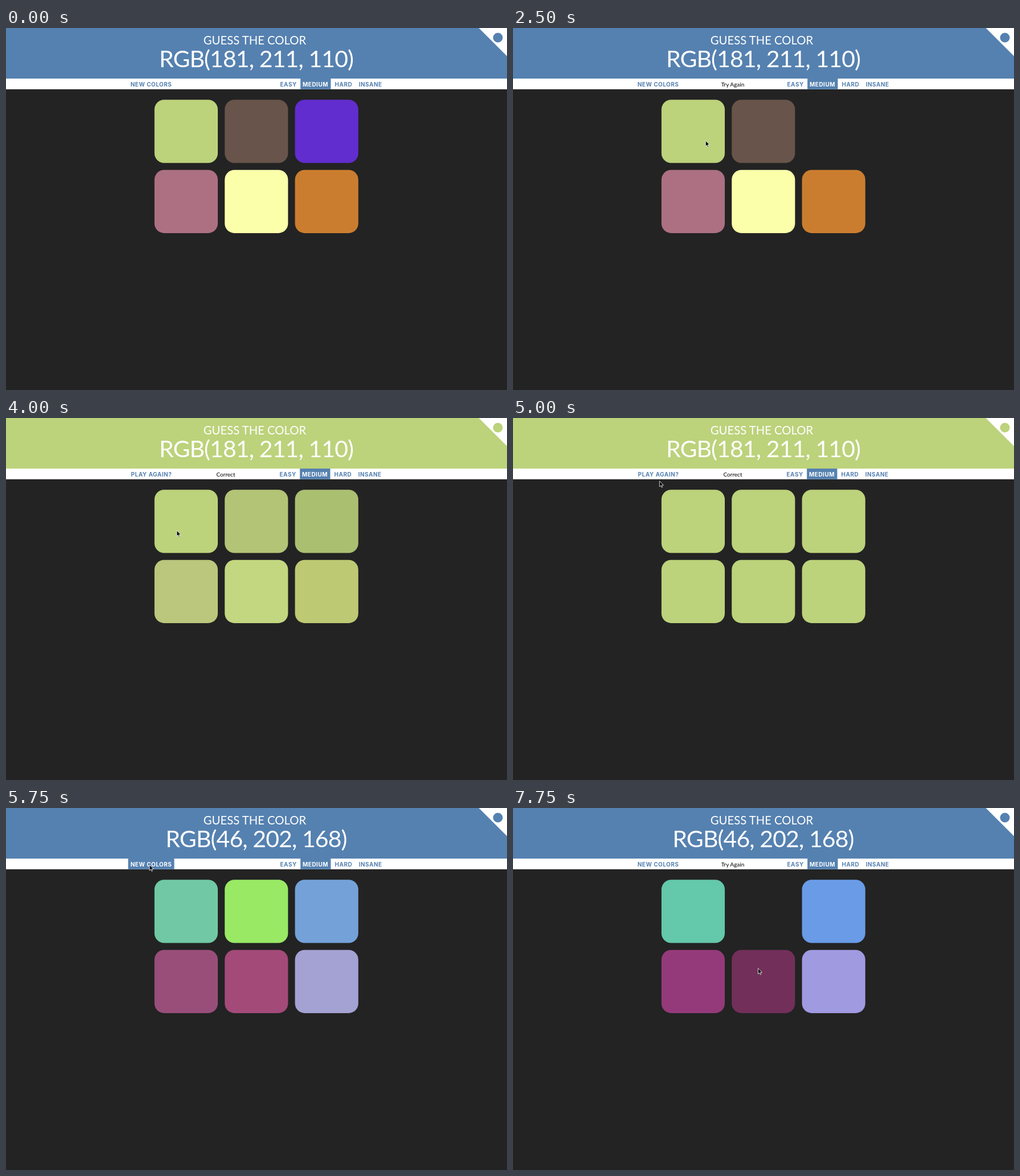
An HTML page for the animation above (8 s loop, 880x637 px).

```html
<!DOCTYPE html>
<html lang="en">
<head>
<meta charset="utf-8">
<title>Guess the color</title>
<style>
  html, body { margin: 0; width: 100%; height: 100%; overflow: hidden; background: #232323; }
  svg { display: block; width: 100%; height: 100%; }
  .title { font-family: Lato, sans-serif; fill: #fff; text-anchor: middle; }
  .nav { font: 700 10px Inter, sans-serif; letter-spacing: .5px; fill: #5581b0; }
  #message { font: 10px Lato, sans-serif; text-anchor: middle; }
</style>
</head>
<body>
<svg viewBox="0 0 880 637">
  <rect id="header" width="880" height="89"/>
  <text class="title" x="437" y="29" font-size="20.3">GUESS THE COLOR</text>
  <text class="title" id="goal" x="439.5" y="69" font-size="41" letter-spacing="-.9"></text>
  <path d="M830.5 0H880V49.5Z" fill="#fff"/>
  <circle id="badge" cx="864" cy="17" r="8.5"/>
  <rect y="89" width="880" height="18.8" fill="#fff"/>
  <rect id="hover" x="214.5" y="89" width="81" height="18.8" fill="#5581b0"/>
  <text class="nav" id="reset" y="102.5"></text>
  <text id="message" x="386" y="102.5"></text>
  <g class="nav" id="modes">
    <rect x="517.2" y="89" width="53.3" height="18.8"/>
    <text x="481.5" y="102.5">EASY</text>
    <text x="521" y="102.5" fill="#fff">MEDIUM</text>
    <text x="577.5" y="102.5">HARD</text>
    <text x="619.7" y="102.5">INSANE</text>
  </g>
  <g id="cells"></g>
  <path id="cursor" d="M0 0V10L2.3 7.9L3.9 11.4L5.4 10.7L3.9 7.3H7Z" stroke="#fff" stroke-width=".8"/>
</svg>
<script>
const $ = id => document.getElementById(id);
const LOOP = 8000, STEP = 250, FADE = 600;
const BLUE = '#5581b0', DARK = '#232323', WIN = '#bcd27b';
const first = [WIN, '#68544a', '#612dce', '#ac7082', '#fbffaa', '#cb7d2f'];
const second = ['#64c8aa', '#93ed62', '#699be7', '#943a7a', '#9f3579', '#a09ae1'];

// Each click: time and the new colour of every cell it affects
const miss = { at: 1850, to: { 2: DARK } };
const win = { at: 3600, to: Array(6).fill(WIN) };
const restart = { at: 5370, to: second };
const missAgain = { at: 6720, to: { 1: DARK } };
const lastMiss = { at: 7630, to: { 4: DARK } };
const clicks = [miss, win, restart, missAgain, lastMiss];

// The pointer rests at each place until it glides to the next
const glides = [
  { from: 500, to: 1750, x: 582, y: 196 },
  { from: 2000, to: 3000, x: 257, y: 199 },
  { from: 3000, to: 3750, x: 300, y: 198 },
  { from: 4500, to: 5250, x: 252, y: 100 },
  { from: 5750, to: 6000, x: 410, y: 180.5 },
  { from: 6750, to: 7500, x: 430.5, y: 282 }
];

const rgb = hex => [1, 3, 5].map(i => parseInt(hex.slice(i, i + 2), 16));
const mix = (a, b, p) => a.map((v, i) => v + (b[i] - v) * p);
// Ease-out progress of t through a span
const progress = (t, from, to) => 1 - (1 - Math.min(1, Math.max(0, (t - from) / (to - from)))) ** 2;

const cells = first.map((_, i) => {
  const cell = document.createElementNS('http://www.w3.org/2000/svg', 'rect');
  const box = { x: 260.8 + i % 3 * 123.4, y: 126.3 + (i > 2) * 123.4, width: 111.2, height: 111.2, rx: 17 };
  for (const key in box) cell.setAttribute(key, box[key]);
  return $('cells').appendChild(cell);
});

function cellColor(i, t) {
  const color = clicks.reduce(
    (c, { at, to }) => to[i] ? mix(c, rgb(to[i]), progress(t, at, at + FADE)) : c, rgb(first[i]));
  return `rgb(${color.map(Math.round)})`;
}

const pointer = t => glides.reduce(
  (p, g) => mix(p, [g.x, g.y], progress(t, g.from, g.to)), [880, 172]);

function draw(t) {
  const fresh = t > restart.at;
  const won = t > win.at && !fresh;
  const wrong = t > (fresh ? missAgain.at : miss.at);
  const [x, y] = pointer(t);
  const hover = x > 214 && x < 296 && y > 89 && y < 108;

  cells.forEach((cell, i) => cell.setAttribute('fill', cellColor(i, t)));
  for (const id of ['header', 'badge']) $(id).setAttribute('fill', won ? WIN : BLUE);
  $('goal').textContent = fresh ? 'RGB(46, 202, 168)' : 'RGB(181, 211, 110)';
  $('message').textContent = won ? 'Correct' : wrong ? 'Try Again' : '';
  $('reset').textContent = won ? 'PLAY AGAIN?' : 'NEW COLORS';
  $('reset').setAttribute('x', won ? 219.5 : 218.7);
  $('reset').style.fill = hover ? '#fff' : BLUE;
  $('hover').style.opacity = +hover;
  $('modes').setAttribute('transform', `translate(${won ? -1 : 0})`);
  $('cursor').style.opacity = +(t >= 750);
  $('cursor').setAttribute('transform', `translate(${x} ${y})`);
}

function tick() {
  draw(Math.floor(performance.now() % LOOP / STEP) * STEP);
  requestAnimationFrame(tick);
}
tick();
</script>
</body>
</html>
```
